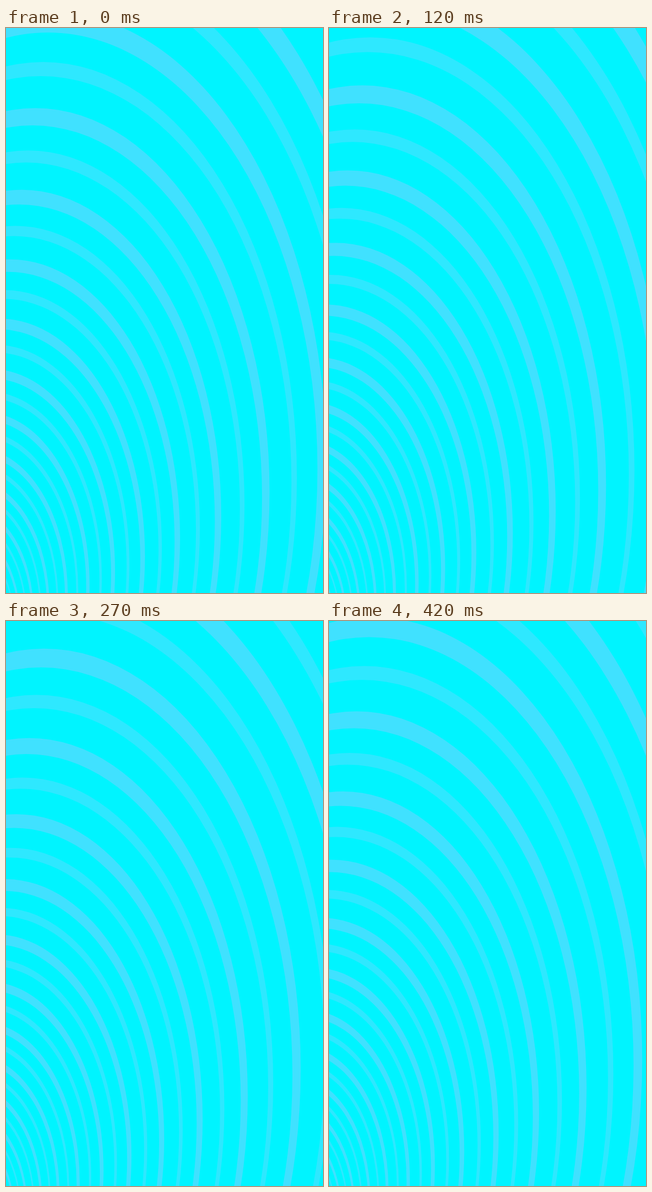
Animation, 561 px wide and 998 px high, one loop 450 ms. Source, as an HTML page with a canvas:

```html
<!DOCTYPE html>
<html lang="en">
<head>
<meta charset="utf-8">
<title>Expanding rings</title>
<style>
  html, body { margin: 0; width: 100%; height: 100%; overflow: hidden; background: #00f4ff; }
  canvas { display: block; width: 100vw; height: 100vh; }
</style>
</head>
<body>
<canvas id="stage" width="561" height="998"></canvas>
<script>
const ctx = document.getElementById('stage').getContext('2d');

const LOOP = 450, STEP = 30;
const GROWTH = 0.0101;         // log scale gained per step
const PERIOD = 0.16;           // log scale between rings of one colour
const ORIGIN = { x: -112, y: 1117 };
const CENTER = { x: 0.168, y: 0.305 };
const OUTER = 0.593, INNER = 0.598;   // right reach relative to top reach

const bands = [
  { color: '#40e1ff', inner: 945, outer: 975.5 },
  { color: '#2ee8ff', inner: 1032, outer: 1057 }
];

// Ellipse whose top lies `size` above the origin
function addEllipse(path, size, reach) {
  const x = ORIGIN.x + CENTER.x * size;
  const y = ORIGIN.y - CENTER.y * size;
  const rx = (reach - CENTER.x) * size;
  const ry = (1 - CENTER.y) * size;
  path.moveTo(x + rx, y);
  path.ellipse(x, y, rx, ry, 0, 0, Math.PI * 2);
}

function draw(time) {
  const step = Math.floor((time % LOOP) / STEP);
  ctx.fillStyle = '#00f4ff';
  ctx.fillRect(0, 0, 561, 998);
  for (const band of bands) {
    const path = new Path2D();
    for (let i = -14; i <= 4; i++) {
      const scale = Math.exp(i * PERIOD + step * GROWTH);
      addEllipse(path, band.outer * scale, OUTER);
      addEllipse(path, band.inner * scale, INNER);
    }
    ctx.fillStyle = band.color;
    ctx.fill(path, 'evenodd');
  }
}

function tick() {
  draw(performance.now());
  requestAnimationFrame(tick);
}
tick();
</script>
</body>
</html>
```
